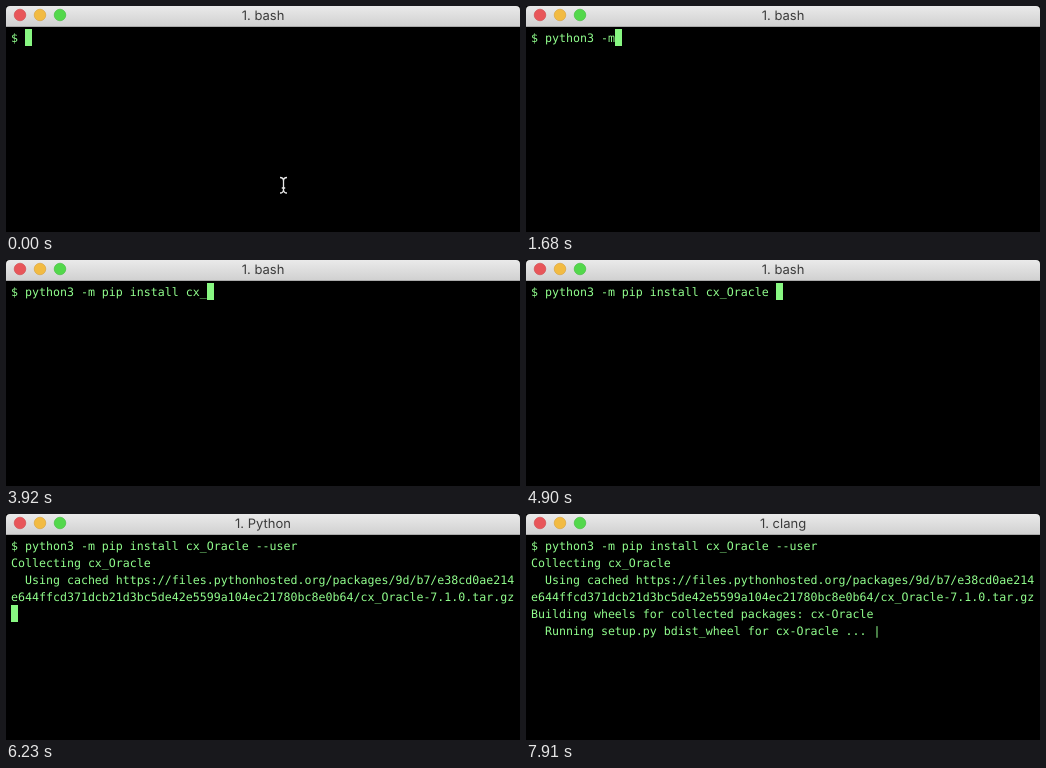
An HTML page for the animation above (8 s loop, 514x226 px).

```html
<!DOCTYPE html>
<html lang="en">
<head>
<meta charset="utf-8">
<title>Terminal</title>
<style>
  html, body { margin: 0; width: 100%; height: 100%; overflow: hidden; background: #000; }
  svg { display: block; }
  text { white-space: pre; text-rendering: geometricPrecision; }
  #title { font: 13px Inter, sans-serif; fill: #3b3b3b; text-anchor: middle; }
  #screen { font: 11.627px "DejaVu Sans Mono", monospace; fill: #90fd8c; }
  #caret { fill: #88f782; }
</style>
</head>
<body>
<svg width="514" height="226" viewBox="0 0 514 226">
  <defs>
    <linearGradient id="bar" x2="0" y2="1">
      <stop stop-color="#eaeaea"/>
      <stop offset="1" stop-color="#d1d1d1"/>
    </linearGradient>
  </defs>
  <rect width="514" height="226"/>
  <path d="M0 20V4Q0 0 4 0H510Q514 0 514 4V20Z" fill="url(#bar)"/>
  <rect y="20" width="514" height="1" fill="#aaa"/>
  <g stroke-width=".6">
    <circle cx="14" cy="9" r="5.8" fill="#e8565a" stroke="#cf4549"/>
    <circle cx="34" cy="9" r="5.8" fill="#f2bb42" stroke="#d9a034"/>
    <circle cx="54" cy="9" r="5.8" fill="#53d84b" stroke="#3fba3a"/>
  </g>
  <text id="title" x="257" y="14"></text>
  <g id="screen"></g>
  <rect id="caret" width="7" height="17"/>
  <path id="pointer" fill="none" stroke="#e8e8e8" stroke-width="1.3"
    d="M274 171.5Q277.5 171.5 277.5 175V183.5Q277.5 187 274 187M281 171.5Q277.5 171.5 277.5 175M277.5 183.5Q277.5 187 281 187M275.8 182H279.2"/>
</svg>
<script>
const LOOP = 8000, LEFT = 5, TOP = 23, COLUMN = 7, ROW = 17;
const command = 'python3 -m pip install cx_Oracle --user';

// One time per typed character.
const keyTimes = [
  70, 210, 280, 420, 560, 560, 700, 980,
  1120, 1680, 1820,
  2100, 2240, 2380, 2520,
  2800, 2870, 2940, 3080, 3080, 3220, 3360, 3430,
  3570, 3640, 3920, 4060, 4200, 4270, 4340, 4480, 4620, 4900,
  4970, 5110, 5250, 5320, 5460, 5530
];

const output = [
  [5670, ''],
  [6160, 'Collecting cx_Oracle\n'],
  [6230, '  Using cached https://files.pythonhosted.org/packages/9d/b7/e38cd0ae214\n' +
         'e644ffcd371dcb21d3bc5de42e5599a104ec21780bc8e0b64/cx_Oracle-7.1.0.tar.gz\n'],
  [6790, 'Building wheels for collected packages: cx-Oracle\n'],
  [6860, '  Running setup.py bdist_wheel for cx-Oracle ... ']
];
const spinner = [[6930, '-'], [7420, '\\'], [7910, '|']];
const titles = [[0, '1. bash'], [5950, '1. Python'], [7490, '1. clang']];

const get = id => document.getElementById(id);
const title = get('title'), screen = get('screen'), caret = get('caret'), pointer = get('pointer');
const latest = (steps, t) => steps.reduce((value, [at, next]) => t >= at ? next : value, '');

const rows = Array.from({ length: 6 }, (_, i) => {
  const row = document.createElementNS('http://www.w3.org/2000/svg', 'text');
  row.setAttribute('x', LEFT);
  row.setAttribute('y', TOP + 13 + i * ROW);
  return screen.appendChild(row);
});

function draw(t) {
  const typed = keyTimes.filter(at => at <= t).length;
  const printed = output.filter(([at]) => at <= t);
  const mark = latest(spinner, t);
  let content = '$ ' + command.slice(0, typed);
  if (printed.length) content += '\n' + printed.map(([, text]) => text).join('') + mark;

  const lines = content.split('\n');
  rows.forEach((row, i) => row.textContent = lines[i] || '');
  caret.setAttribute('x', LEFT + lines.at(-1).length * COLUMN);
  caret.setAttribute('y', TOP + (lines.length - 1) * ROW);
  caret.style.display = mark ? 'none' : '';
  pointer.style.display = typed ? 'none' : '';
  title.textContent = latest(titles, t);
}

const start = performance.now();
function tick() {
  draw((performance.now() - start) % LOOP);
  requestAnimationFrame(tick);
}
tick();
</script>
</body>
</html>
```
